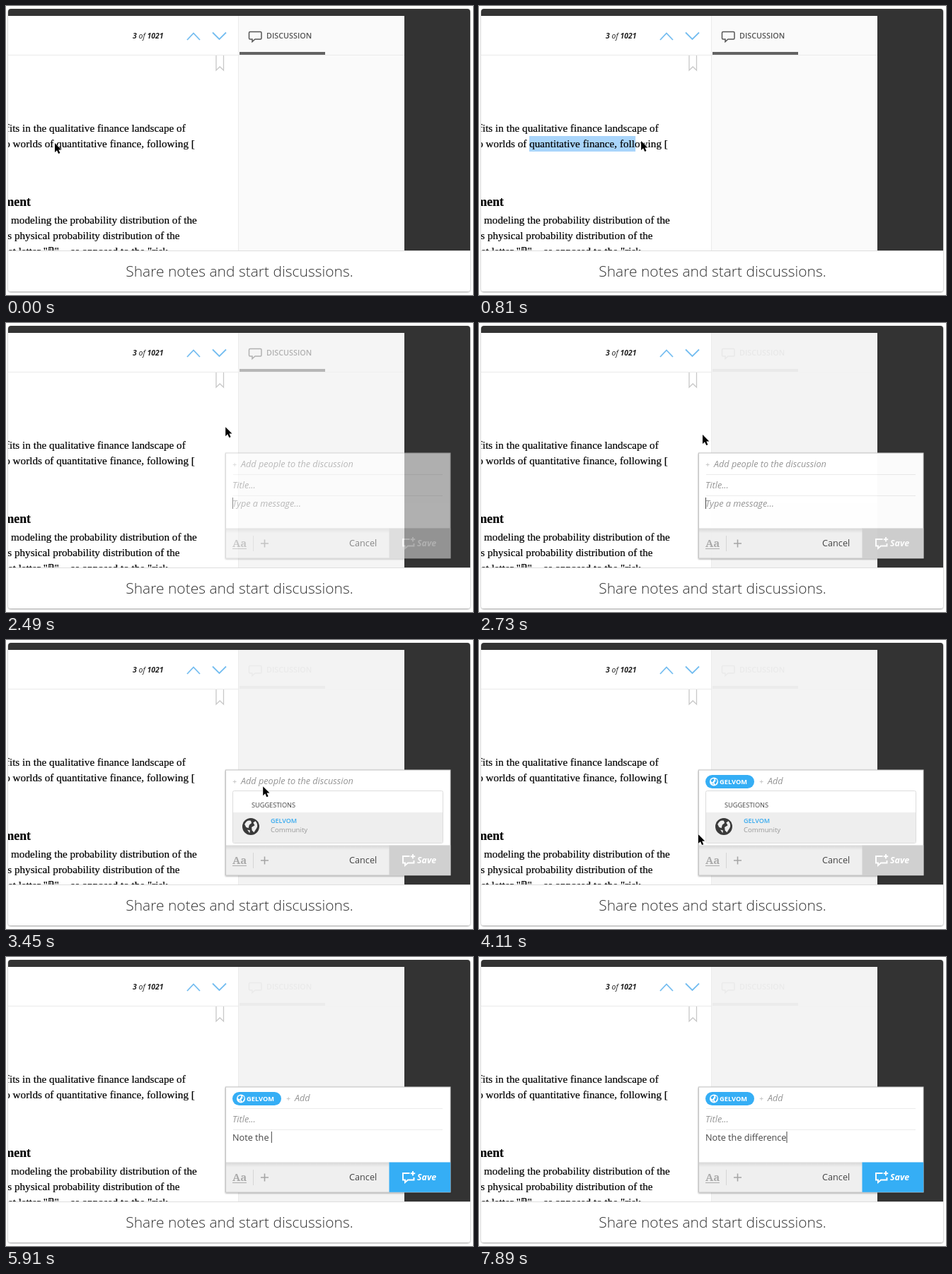
Recreate the animation shown at these times as an HTML page. Size 660 by 409 pixels, loop 8 s.

```html
<!DOCTYPE html>
<html lang="en">
<head>
<meta charset="utf-8">
<title>Share notes and start discussions</title>
<style>
  html, body { margin: 0; width: 100%; height: 100%; overflow: hidden; background: #fff; }
  svg { display: block; width: 660px; height: 409px; }
  text { font-family: "Open Sans", sans-serif; font-variant-ligatures: none; white-space: pre; }
  .paper text { font: 15.2px "Liberation Serif", serif; fill: #000; stroke: #000; stroke-width: .2; }
  .paper .head { font-size: 17.8px; font-weight: bold; }
  .end { text-anchor: end; }
  .caption { font-size: 21px; font-weight: 300; fill: #333; text-anchor: middle; }
  .count { font-size: 10.5px; font-style: italic; fill: #222; }
  .b { font-weight: 700; }
  .tab { font-size: 10.8px; font-weight: 600; fill: #555; }
  .ui { font-size: 12.7px; fill: #444; }
  .hint { font-size: 12.7px; font-style: italic; fill: #959595; }
  .plus { font-size: 11px; fill: #bbb; }
  .line { fill: none; stroke-width: 1; stroke: #ebebeb; }
  .icon { fill: none; stroke: #fff; stroke-width: 1.9; }
  .chip { font-size: 9.3px; font-weight: 700; fill: #fff; }
  .name { font-size: 9px; font-weight: 600; fill: #35a9ef; }
  .small { font-size: 9.2px; fill: #444; }
  .note { font-size: 9.6px; fill: #999; }
  .aa { font: bold 15px "Noto Serif", serif; fill: #aaa; }
  .save { font-size: 12.4px; font-weight: 700; font-style: italic; fill: #fff; }
</style>
</head>
<body>
<svg viewBox="0 0 660 409">
  <defs>
    <clipPath id="card"><path d="M3 346V8a4 4 0 0 1 4-4H652a4 4 0 0 1 4 4V346Z"/></clipPath>
    <filter id="soft" x="-5%" y="-5%" width="110%" height="115%">
      <feDropShadow dx="0" dy="1" stdDeviation="1.3" flood-opacity=".4"/>
    </filter>
    <linearGradient id="shade" x2="0" y2="1">
      <stop stop-color="#000" stop-opacity=".1"/><stop offset="1" stop-color="#000" stop-opacity="0"/>
    </linearGradient>
    <g id="addNote" class="icon">
      <path d="M10.5 3H1V12.5H4V16L8 12.5H16.5V9"/>
      <path d="M15 0V6.4M11.8 3.2H18.2"/>
    </g>
    <path id="land" d="M-.8 -.3Q-.5 -.9 0 -.75L.1 -.45L-.2 -.2L-.3 .2L-.6 .1ZM.1 .1L.5 -.15L.3 -.5L.6 -.7Q1 -.2 .75 .2L.4 .75L.15 .5ZM-.45 .4L-.1 .5L-.15 .85Z"/>
  </defs>

  <rect x="3" y="4" width="653" height="400" rx="4" fill="#fff" filter="url(#soft)"/>

  <g clip-path="url(#card)">
    <rect x="3" y="4" width="653" height="342" fill="#333"/>
    <rect x="3" y="14" width="560" height="332" fill="#fff"/>
    <rect x="329" y="14" width="234" height="332" fill="#fafafa"/>
    <path class="line" d="M3 69.5H563M328.5 14V346"/>

    <text class="count" x="179" y="46"><tspan class="b">3</tspan> of <tspan class="b">1021</tspan></text>
    <path d="M256 48L265 38.5L274 48M292 37.5L301.5 47L311 37.5" fill="none" stroke="#74bdf0" stroke-width="1.8"/>
    <path d="M297 70V91L302.2 86L307.5 91V70" fill="none" stroke="#c8c8c8" stroke-width="1.3"/>

    <path d="M345 36.5H359.5Q361 36.5 361 38V45.5Q361 47 359.5 47H352L348 50.5V47H345Q343.5 47 343.5 45.5V38Q343.5 36.5 345 36.5Z" fill="none" stroke="#555" stroke-width="1.5"/>
    <text class="tab" x="368" y="46">DISCUSSION</text>
    <rect x="330" y="65" width="121" height="4" fill="#636363"/>
    <rect id="veil" x="329" y="14" width="234" height="332" fill="#f3f3f3"/>

    <rect id="mark" x="71" y="184" height="22" fill="#a9d5fb"/>
    <g class="paper">
      <text x="-28.8" y="178">benefits in the qualitative finance landscape of</text>
      <text x="-17" y="200">two worlds of quantitative finance, following [</text>
      <text class="head end" x="35" y="283">Environment</text>
      <text x="7" y="308">modeling the probability distribution of the</text>
      <text x="2.2" y="330">s physical probability distribution of the</text>
      <text class="end" x="75" y="352">typeset letter "ℙ"</text>
      <text class="end" x="234" y="352">, as opposed to the "risk-</text>
    </g>

    <g id="palette">
      <rect x="198" y="133" width="121.5" height="32.5" rx="5" fill="#333"/>
      <path d="M251 165H265L258 172Z" fill="#333"/>
      <circle cx="217" cy="149.5" r="9.5" fill="#f3e71b"/>
      <circle cx="241" cy="149.5" r="9.5" fill="#4be783"/>
      <circle cx="265" cy="149.5" r="9.5" fill="#38aff3"/>
      <path d="M283.5 138V161" stroke="#555"/>
      <use href="#addNote" x="289" y="140"/>
    </g>

    <g id="dialog">
      <rect x="310.5" y="184" width="317.5" height="148.8" fill="#fff" stroke="#c4c4c4" filter="url(#soft)"/>
      <path class="line" d="M321 214.5H617M321 244.5H617"/>
      <g id="invite">
        <text class="hint plus" x="320" y="204">+</text>
        <text class="hint" x="332" y="204">Add people to the discussion</text>
      </g>
      <g id="chip">
        <rect x="320" y="191" width="69" height="19" rx="9.5" fill="#35aef5"/>
        <circle cx="332" cy="200.5" r="6" fill="#fff"/>
        <use href="#land" fill="#35aef5" transform="translate(332 200.5) scale(5.5)"/>
        <text class="chip" x="340" y="204">GELVOM</text>
        <text class="hint plus" x="396" y="204">+</text>
        <text class="hint" x="408" y="204">Add</text>
      </g>
      <text class="hint" x="320" y="234">Title...</text>
      <text id="ask" class="hint" x="320" y="260">Type a message...</text>
      <text id="msg" class="ui" x="320" y="260"></text>
      <rect id="caret" y="247" width="1" height="16" fill="#444"/>

      <rect x="311" y="290.5" width="317" height="41.8" fill="#efefef"/>
      <rect x="311" y="290.5" width="231" height="7" fill="url(#shade)"/>
      <text class="aa" x="320" y="317">Aa</text>
      <path d="M320 319.5H340" stroke="#aaa"/>
      <path d="M349.5 301V323" stroke="#d5d5d5"/>
      <path d="M360 312H371M365.5 306.5V317.5" stroke="#a5a5a5" stroke-width="1.6"/>
      <text class="ui" x="485" y="316">Cancel</text>
      <rect id="button" x="541.5" y="290.5" width="86.7" height="42.3"/>
      <use href="#addNote" x="560" y="303"/>
      <text class="save" x="581" y="316">Save</text>

      <g id="list">
        <rect x="320.5" y="213.5" width="297" height="74" rx="2" fill="#fff" stroke="#dcdcdc"/>
        <rect x="321" y="244" width="296" height="43" fill="#eee"/>
        <text class="small" x="347" y="237">SUGGESTIONS</text>
        <circle cx="346" cy="264" r="12" fill="#3a3a3a"/>
        <use href="#land" fill="#eee" transform="translate(346 264) scale(11)"/>
        <text class="name" x="374" y="259">GELVOM</text>
        <text class="note" x="374" y="272">Community</text>
      </g>
    </g>

    <path id="pointer" d="M0 0V13L3 10.2L5.2 15L7.4 14.1L5.3 9.4H9.3Z" fill="#000" stroke="#fff" paint-order="stroke"/>
  </g>

  <path d="M3 346.5H656" stroke="#dedede"/>
  <text class="caption" x="330" y="383">Share notes and start discussions.</text>
</svg>

<script>
const LOOP = 8000;
const NOTE = "Note the difference";
const $ = id => document.getElementById(id);

// Rows of time, x, y.
const PATH = [
  [30, 69, 194], [810, 229, 191], [1080, 258, 191], [1400, 262, 190],
  [1650, 271, 186], [1890, 308, 143], [2400, 308, 143], [2730, 316, 158],
  [2880, 320, 170], [3180, 360, 199], [3420, 360, 199], [3660, 385, 262],
  [3780, 385, 262], [4110, 310, 275], [4170, 303, 277], [4470, 303, 277],
  [4740, 345, 254]
];
const MARK = [[120, 71], [810, 221], [1080, 258]];
// Time at which each letter of the note appears.
const KEYS = [4920, 5040, 5160, 5280, 5460, 5550, 5640, 5730, 5910,
  6360, 6510, 6690, 6810, 6960, 7020, 7260, 7590, 7770, 7890];

function along(rows, t) {
  const i = rows.findIndex(row => row[0] > t);
  if (i === 0) return rows[0].slice(1);
  if (i < 0) return rows[rows.length - 1].slice(1);
  const a = rows[i - 1], b = rows[i];
  const k = (t - a[0]) / (b[0] - a[0]);
  return a.slice(1).map((v, n) => v + (b[n + 1] - v) * k);
}

const ramp = (t, from, to) => Math.min(1, Math.max(0, (t - from) / (to - from)));
const easeOut = k => 1 - (1 - k) ** 2;
const within = (t, from, to) => t >= from && t < to;
const show = (id, on) => $(id).setAttribute("visibility", on ? "inherit" : "hidden");
const fade = (id, value) => $(id).setAttribute("opacity", value);

function draw(t) {
  const [x, y] = along(PATH, t);
  $("pointer").setAttribute("transform", `translate(${x} ${y})`);
  show("pointer", t < KEYS[0]);

  $("mark").setAttribute("width", along(MARK, t)[0] - 71);
  show("mark", t < 2130);
  fade("palette", ramp(t, 1260, 1380) * (1 - ramp(t, 2070, 2190)));

  const opening = easeOut(ramp(t, 2310, 2790));
  fade("veil", 0.95 * opening);
  fade("dialog", opening);

  const chosen = t >= 3810;
  show("invite", !chosen);
  show("chip", chosen);
  show("list", within(t, 3300, 4500));

  const typed = KEYS.filter(k => k <= t).length;
  const msg = $("msg");
  msg.textContent = NOTE.slice(0, typed);
  show("ask", !typed);
  show("caret", within(t, 2310, 3210) || t >= 4800);
  $("caret").setAttribute("x", 320 + (typed ? msg.getComputedTextLength() : 0));
  $("button").setAttribute("fill", typed ? "#35aef5" : "#d0d0d0");
}

const start = performance.now();
function tick() {
  draw((performance.now() - start) % LOOP);
  requestAnimationFrame(tick);
}
tick();
</script>
</body>
</html>
```
